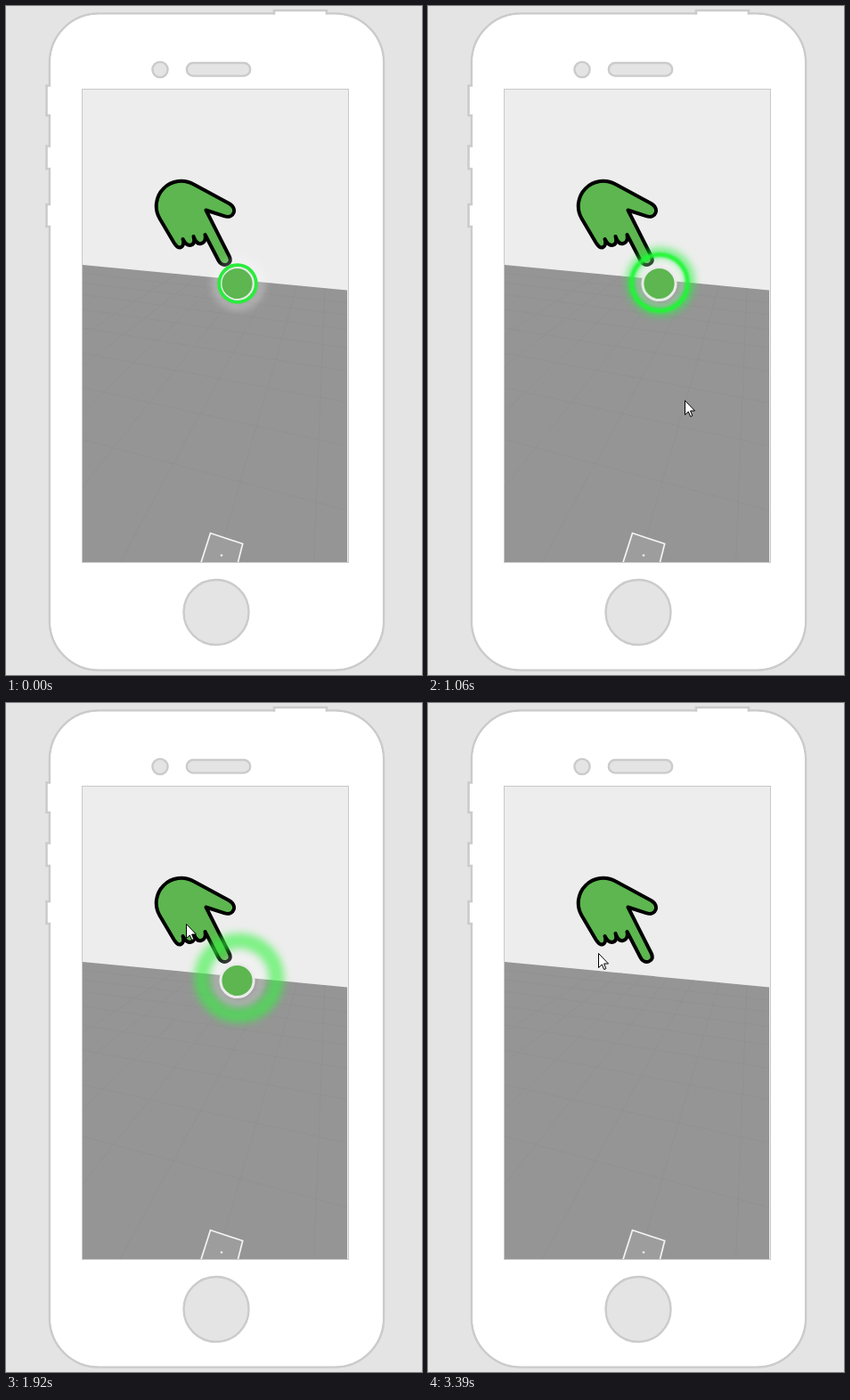
An HTML page for the animation above (3.46 s loop, 467 by 752 pixels).

```html
<!DOCTYPE html>
<html lang="en">
<head>
<meta charset="utf-8">
<title>Tap gesture</title>
<style>
  html, body { margin: 0; width: 100%; height: 100%; overflow: hidden; background: #e4e4e4; }
  svg { display: block; width: 467px; height: 752px; }
</style>
</head>
<body>
<svg viewBox="0 0 467 752">
  <defs>
    <filter id="soft" x="-50%" y="-50%" width="200%" height="200%"><feGaussianBlur stdDeviation="4"/></filter>
    <filter id="edge" x="-50%" y="-50%" width="200%" height="200%"><feGaussianBlur stdDeviation="0.9"/></filter>
    <clipPath id="screen"><rect x="86" y="94" width="297" height="531"/></clipPath>
  </defs>

  <!-- phone -->
  <g fill="#fff" stroke="#cbcbcb" stroke-width="2.6">
    <rect x="49" y="8.5" width="375" height="738" rx="55"/>
    <path d="M301 12V5H360V12M54 89.5H45.5V123H54M54 157.5H45.5V183H54M54 223H45.5V248H54"/>
  </g>
  <rect x="50.2" y="9.7" width="372.6" height="735.6" rx="54" fill="#fff"/>
  <g fill="#e4e4e4" stroke="#cbcbcb" stroke-width="2.4">
    <circle cx="173" cy="71.5" r="8.6"/>
    <rect x="202.8" y="64" width="71.4" height="14.6" rx="7.3"/>
    <circle cx="236" cy="681.5" r="36.5"/>
  </g>

  <!-- scene -->
  <rect x="85.5" y="93.5" width="299" height="532" fill="#ededed" stroke="#c8c8c8"/>
  <g clip-path="url(#screen)">
    <clipPath id="floor"><path d="M86 291L384 319.7V626H86z"/></clipPath>
    <path d="M86 291L384 319.7V626H86z" fill="#959595"/>
    <path id="grid" clip-path="url(#floor)" fill="none" stroke="#8d8d8d" stroke-width=".9" opacity=".5"/>
    <path d="M218.5 627L229.5 592.5 265.7 604.5 260 627" fill="#9d9d9d" stroke="#f4f4f4" stroke-width="1.7"/>
    <circle cx="242" cy="617.5" r="1.3" fill="#eee"/>
  </g>

  <!-- hand -->
  <path fill="#5db650" stroke="#000" stroke-width="4" stroke-linejoin="round" d="M188.5 266L172.6 239A28 28 0 0 1 210.8 200.6L250.5 222C255 224.7 257 228.8 255.5 232.5C253.5 237 249 237.5 245 236.2L224.5 229.5L250.5 281C253 286 251.5 289 248 290.5C244 292 240.5 290 238.5 286L223.5 257C224.5 262 223 266 219 267C215 268 212.5 265 210.5 259C212 265 211 268.5 206.5 269C202.5 269 200.5 266 198.5 262C200 267 199 270.5 195.5 271.5C192 272 190.5 269 188.5 266Z"/>

  <!-- tap marker -->
  <g id="tap">
    <circle cx="261" cy="312.5" r="25" fill="none" stroke="#fff" stroke-width="9" opacity=".3" filter="url(#soft)"/>
    <circle cx="259.5" cy="312" r="18.6" fill="#5db650" stroke="#ebebeb" stroke-width="3"/>
    <g fill="none">
      <circle class="ring" cx="260" cy="312" r="20.8" stroke="#2aec3c" stroke-width="3.8"/>
      <g class="ring">
        <circle cx="261" cy="310" r="33" stroke="#22f23a" stroke-width="11" opacity=".6" filter="url(#soft)"/>
        <circle cx="260" cy="311" r="31.5" stroke="#1af833" stroke-width="4.8" opacity=".9" filter="url(#edge)"/>
      </g>
      <circle class="ring" cx="261.7" cy="309.3" r="42" stroke="#30f43c" stroke-width="17" opacity=".6" filter="url(#soft)"/>
    </g>
  </g>

  <path id="cursor" d="M.5 .5V16.5L4.3 13 6.7 18.5 8.8 17.6 6.6 12H11.5z" fill="#fff" stroke="#000"/>
</svg>
<script>
const LOOP = 3460, STEP = 77.2, LEAD = 20;
const $ = id => document.getElementById(id);

// floor in perspective: rows thin out with depth, columns fan from one point
function gridPath() {
  let d = "";
  for (let n = 0; n < 8; n++) {
    const y = 191 + 1214 / (n + 4.1);
    d += `M86 ${y}L384 ${1.25 * y - 41.5}`;
  }
  for (let n = 0; n < 7; n++) d += `M363 190l${-436 * (0.04 + 0.25 * n)} 436`;
  return d;
}
$("grid").setAttribute("d", gridPath());

// pointer key points: [step, x, y]
const path = [[6, 381, 727], [11, 318, 571], [14, 288, 443], [20, 216, 266],
              [23, 202, 248], [42, 202, 248], [44, 191, 281]];

function pointer(k) {
  const i = Math.max(1, path.findIndex(p => p[0] >= k));
  const [a, b] = [path[i - 1], path[i]];
  const f = (k - a[0]) / (b[0] - a[0]);
  return [1, 2].map(j => Math.round(a[j] + (b[j] - a[j]) * f));
}

// the ring spreads small, middle, large every ten steps
function ringSize(k) {
  const phase = (k + 8) % 10;
  return phase < 3 ? 1 : phase < 6 ? 2 : 0;
}

const rings = [...document.querySelectorAll(".ring")];
const show = (el, on) => { el.style.display = on ? "inline" : "none"; };

function draw(t) {
  const k = Math.min(44, Math.floor((t + LEAD) / STEP));
  show($("tap"), k < 31);
  rings.forEach((el, i) => show(el, i === ringSize(k)));
  show($("cursor"), k >= 6);
  $("cursor").setAttribute("transform", `translate(${pointer(k)})`);
}

const start = performance.now();
function tick() {
  draw((performance.now() - start) % LOOP);
  requestAnimationFrame(tick);
}
tick();
</script>
</body>
</html>
```
